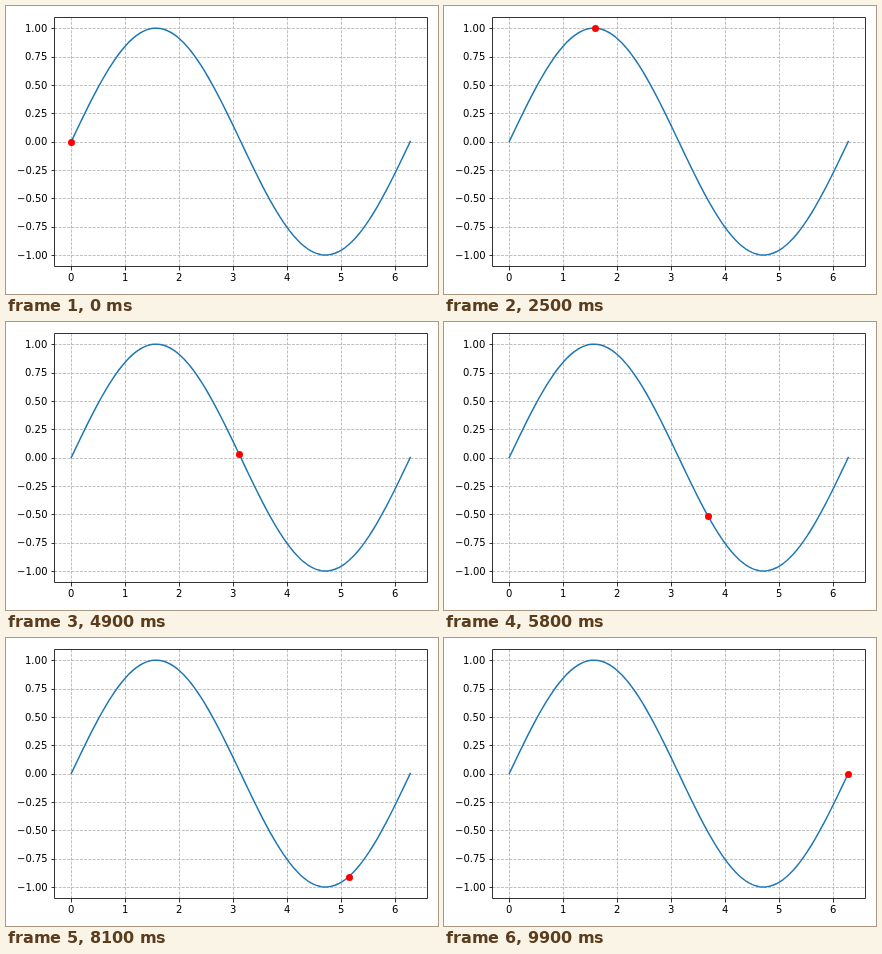
Write an HTML page with a canvas that moves like this. It is 432 px wide and 288 px high and loops after 10000 ms.

```html
<!DOCTYPE html>
<html lang="en">
<head>
<meta charset="utf-8">
<title>Point on a sine curve</title>
<style>
html, body { margin: 0; width: 100%; height: 100%; overflow: hidden; background: #fff; }
canvas { display: block; width: 432px; height: 288px; }
</style>
</head>
<body>
<canvas id="plot" width="432" height="288"></canvas>
<script>
const W = 432, H = 288;
const STEPS = 100, STEP_MS = 100;
const box = { left: 48.3, right: 421.2, top: 10.8, bottom: 260.35 };
const TAU = Math.PI * 2;

// The data range fills the axes with a 5% margin on each side.
const unitX = (box.right - box.left) / (1.1 * TAU);
const unitY = (box.bottom - box.top) / 2.2;
const toX = v => box.left + (box.right - box.left) / 22 + v * unitX;
const toY = v => (box.top + box.bottom) / 2 - v * unitY;
const angle = i => TAU * i / (STEPS - 1);
const snap = v => Math.floor(v + 0.5) + 0.5;

const edge = {
  left: snap(box.left), right: snap(box.right),
  top: snap(box.top), bottom: snap(box.bottom)
};
const xTicks = Array.from({ length: 7 }, (_, i) => i);
const yTicks = Array.from({ length: 9 }, (_, i) => (i - 4) / 4);

const view = document.getElementById('plot').getContext('2d');
const chart = document.createElement('canvas');
chart.width = W;
chart.height = H;
const ctx = chart.getContext('2d');

function line(x1, y1, x2, y2) {
  ctx.beginPath();
  ctx.moveTo(x1, y1);
  ctx.lineTo(x2, y2);
  ctx.stroke();
}

function drawGrid() {
  ctx.strokeStyle = '#b0b0b0';
  ctx.lineWidth = 0.8;
  ctx.setLineDash([2.96, 1.28]);
  for (const v of xTicks) line(snap(toX(v)), edge.bottom, snap(toX(v)), edge.top);
  for (const v of yTicks) line(edge.left, snap(toY(v)), edge.right, snap(toY(v)));
  ctx.setLineDash([]);
}

function drawCurve() {
  ctx.strokeStyle = '#1f77b4';
  ctx.lineWidth = 1.5;
  ctx.lineCap = 'square';
  ctx.lineJoin = 'round';
  ctx.beginPath();
  for (let i = 0; i < STEPS; i++) ctx.lineTo(toX(angle(i)), toY(Math.sin(angle(i))));
  ctx.stroke();
  ctx.lineCap = 'butt';
}

function drawAxes() {
  ctx.strokeStyle = ctx.fillStyle = '#000';
  ctx.lineWidth = 0.8;
  ctx.font = '10px "DejaVu Sans", sans-serif';
  ctx.textBaseline = 'alphabetic';
  for (const v of xTicks) {
    const x = snap(toX(v)), text = String(v);
    line(x, edge.bottom, x, edge.bottom + 4);
    ctx.fillText(text, Math.round(toX(v) - ctx.measureText(text).width / 2), 275);
  }
  for (const v of yTicks) {
    const y = snap(toY(v)), text = v.toFixed(2).replace('-', '\u2212');
    line(edge.left - 3, y, edge.left, y);
    ctx.fillText(text, Math.round(box.left - 7 - ctx.measureText(text).width),
      Math.round(toY(v) + 3.8));
  }
  ctx.strokeRect(edge.left, edge.top, edge.right - edge.left, edge.bottom - edge.top);
}

function drawDot(i) {
  view.fillStyle = '#f00';
  view.beginPath();
  view.arc(snap(toX(angle(i))), snap(toY(Math.sin(angle(i)))), 3.5, 0, TAU);
  view.fill();
}

ctx.fillStyle = '#fff';
ctx.fillRect(0, 0, W, H);
drawGrid();
drawCurve();
drawAxes();

const start = performance.now();

function render(now) {
  const time = Math.max(0, now - start);
  view.drawImage(chart, 0, 0);
  drawDot(Math.floor(time / STEP_MS) % STEPS);
  requestAnimationFrame(render);
}

render(start);
</script>
</body>
</html>
```
